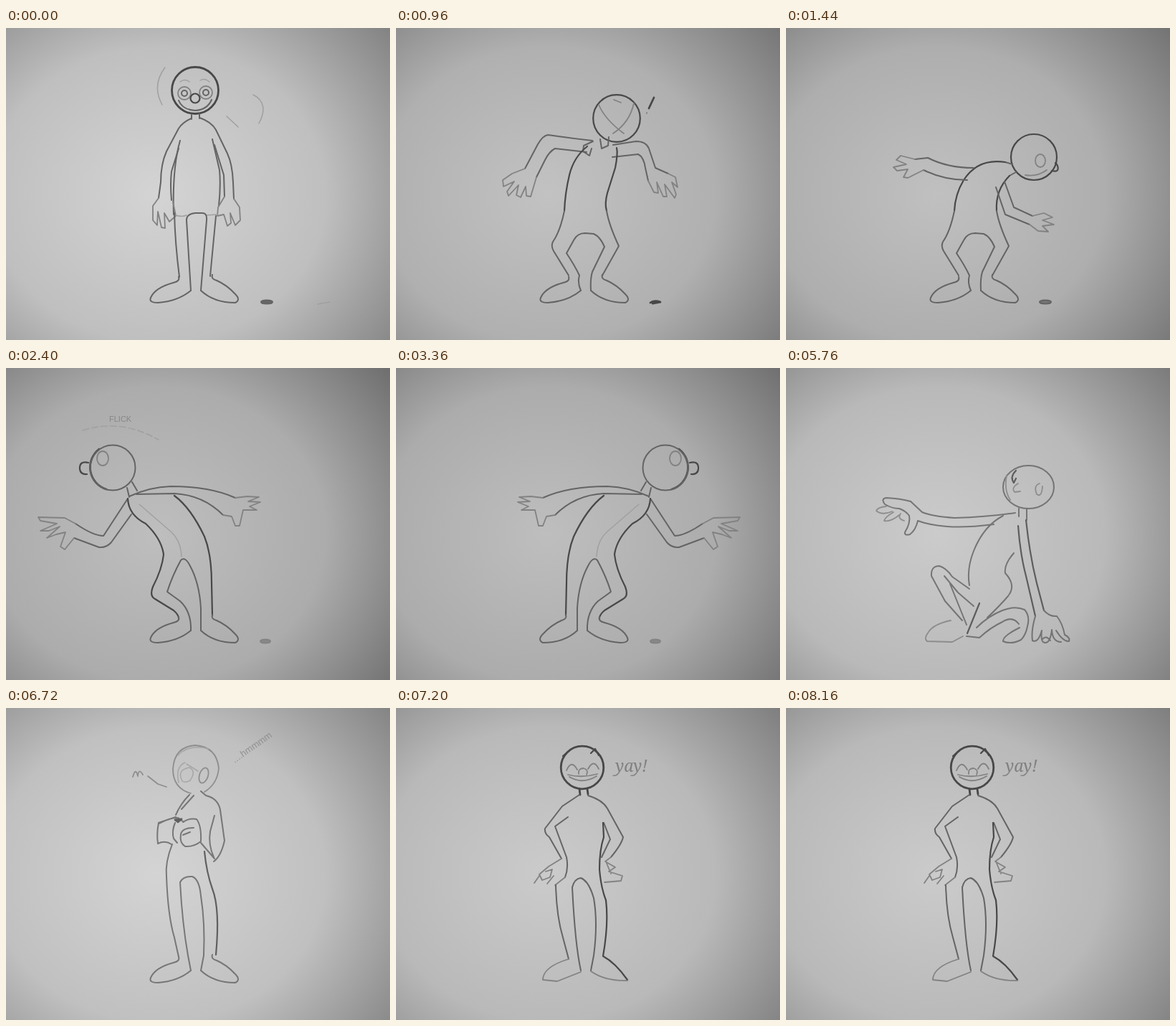
An HTML page for the animation above (8200 ms loop, 536 by 435 pixels).

```html
<!DOCTYPE html>
<html lang="en">
<head>
<meta charset="utf-8">
<title>Pencil test</title>
<style>
html, body { margin: 0; width: 100%; height: 100%; overflow: hidden; background: #aaa; }
#stage { width: 536px; height: 435px; overflow: hidden; }
#reel { display: flex; width: 5360px; animation: flip 8.2s step-end infinite; }
svg {
  display: block; flex: none; width: 536px; height: 435px; overflow: hidden;
  background: radial-gradient(ellipse 450px 395px at 212px 232px, var(--c), var(--m) 52%, var(--e) 100%);
}
.ink { filter: blur(.55px); fill: none; stroke: #646464; stroke-width: 2; stroke-linecap: round; stroke-linejoin: round; }
.dark { stroke: #484848; stroke-width: 2.2; }
.bold { stroke: #484848; stroke-width: 2.8; }
.soft { stroke: #828282; stroke-width: 1.8; }
.faint { stroke: #a0a0a0; stroke-width: 1.5; }
.light { opacity: .82; }
.ink text { fill: #808080; stroke: none; font: italic 22px "Noto Serif", "Liberation Serif", serif; }
.ink .note { fill: #868686; font: 13px "Liberation Sans", sans-serif; }

/* one strip of drawings, moved a full stage width at each cut */
@keyframes flip {
  0% { transform: translateX(0); }
  11.7073% { transform: translateX(-536px); }
  17.561% { transform: translateX(-1072px); }
  29.2683% { transform: translateX(-1608px); }
  40.9756% { transform: translateX(-2144px); }
  52.6829% { transform: translateX(-2680px); }
  64.3902% { transform: translateX(-3216px); }
  70.2439% { transform: translateX(-3752px); }
  81.9512% { transform: translateX(-4288px); }
  87.8049%, 100% { transform: translateX(-4824px); }
}
</style>
</head>
<body>
<div id="stage">
<div id="reel">

<!-- standing -->
<svg style="--c:#d4d4d4;--m:#bfbfbf;--e:#787878">
  <defs>
    <path id="feet" d="M241 347Q243 353 234 355Q208 362 202 376Q199 383 212 383Q240 381 258 366M272 366Q290 383 320 383Q328 379 320 371Q308 358 294 352Q286 350 288 344"/>
    <path id="legs" d="M235 258Q236 300 242 347M258 366L252 268Q252 259 264 258L274 258Q281 258 280 268L272 366M293 262L285 346"/>
    <path id="bent" d="M235 255Q229 284 219 298Q216 304 220 311L241 345M258 366Q253 355 256 345Q250 332 238 314L248 296Q253 286 264 286L276 287Q285 291 291 305L274 340Q271 350 272 366M294 255Q297 274 311 304L288 345"/>
    <g id="peer">
      <path class="bold" d="M130 113A32 32 0 0 0 140 169"/>
      <circle cx="149" cy="139" r="31.5"/>
      <path class="dark" d="M115 132Q102 129 103 141Q104 149 113 148"/>
      <ellipse class="soft" cx="135" cy="126" rx="8" ry="10"/>
      <path d="M169 167L172 180M176 159L183 171"/>
      <path d="M172 179Q200 166 230 165Q285 165 320 181M182 176L235 175Q275 177 303 205"/>
      <path class="soft" d="M320 181L337 179L353 180L338 186L355 187L340 193L350 198L331 198L326 220L320 220L315 207L303 205"/>
      <path d="M170 182L136 234Q122 234 97 217M175 204L147 243Q140 251 130 250L95 237"/>
      <path class="soft" d="M97 217L82 209L45 208L48 213L71 217L48 227L60 227L75 221L57 237L70 232L83 229L76 249L82 253L95 237"/>
      <path class="dark" d="M170 182Q171 205 195 217Q217 238 220 260Q218 280 205 305Q200 318 208 322L234 338Q241 344 241 349M235 178Q258 195 277 235Q287 260 287 300L288 345"/>
      <path d="M258 366Q259 340 243 325L225 312Q232 290 244 268Q250 262 257 276Q270 300 272 335L272 366"/>
      <path class="faint" d="M186 190L230 228Q244 240 245 263"/>
      <use href="#feet"/>
    </g>
  </defs>
  <g class="ink">
    <circle class="bold" cx="264" cy="87" r="32.5"/>
    <g class="soft">
      <circle cx="249" cy="91" r="9"/><circle cx="279" cy="90" r="9"/>
      <path class="faint" d="M243 75Q250 70 256 75M271 73Q277 69 284 75"/>
    </g>
    <circle cx="249" cy="91" r="4"/><circle cx="279" cy="90" r="4"/>
    <circle class="dark" cx="264" cy="98" r="6.5"/>
    <path d="M241 101Q246 114 264 115Q281 114 287 100M259 121V127M270 120V126"/>
    <path class="faint" d="M222 55Q203 80 218 107M345 93Q368 105 353 133M308 123L324 138"/>
    <path d="M259 126Q247 131 241 140L224 172Q216 190 216 215L213 237M270 125Q287 131 293 142L309 175Q316 190 317 215L318 238"/>
    <path d="M243 157Q232 195 234 260M288 155L298 198Q300 220 297 248"/>
    <path d="M241 168L231 200Q229 218 231 240M291 163L304 205L305 235"/>
    <path class="soft" d="M213 237L205 248L205 268L211 275L212 256L217 278L222 279L221 258L228 270L237 262L233 242M305 235L296 250L295 262L304 260L309 276L314 272L313 258L320 275L327 268L326 250L318 238"/>
    <path class="faint" d="M237 261Q246 264 252 261M280 261L295 260"/>
    <use href="#legs"/><use href="#feet"/>
    <ellipse cx="364" cy="382" rx="8" ry="2.6" fill="#666"/>
    <path class="faint" d="M435 385L452 382"/>
  </g>
</svg>

<!-- startled -->
<svg style="--c:#c2c2c2;--m:#b0b0b0;--e:#6c6c6c">
  <g class="ink">
    <circle class="dark" cx="308" cy="126" r="32.8"/>
    <path class="soft" d="M283 107Q292 128 318 147M332 105Q326 132 303 147M304 100L314 104"/>
    <path class="bold" d="M360 97L353 112"/><path class="soft" d="M350 118v1"/>
    <path d="M285 155L287 168L296 164L297 152"/>
    <path d="M274 157Q240 153 212 149Q205 150 198 162L180 196M266 173L222 168Q214 172 208 184L196 208"/>
    <path class="soft" d="M180 196L162 203L149 212L150 221L165 214L155 228L157 234L171 219L168 233L174 236L181 221L182 234L188 235L196 208"/>
    <path d="M275 158L262 164L261 172L270 178L273 168M303 163L335 158Q349 158 353 168L362 195L380 203M302 180L338 176Q346 180 348 195L352 213"/>
    <path class="soft" d="M352 213L360 229L366 230L364 215L373 235L378 235L375 218L389 237L391 232L385 215L393 222L390 208L380 203"/>
    <path class="dark" d="M267 165Q248 180 242 205Q236 230 235 255M308 167Q310 175 306 195L295 230Q291 245 294 255"/>
    <use href="#bent"/><use href="#feet"/>
    <path class="bold" d="M355 383Q360 379 369 382L358 384"/>
  </g>
</svg>

<!-- notices the thing on the floor -->
<svg style="--c:#c0c0c0;--m:#aeaeae;--e:#696969">
  <g class="ink">
    <circle class="dark" cx="346" cy="180" r="32"/>
    <path class="soft" d="M348 185a7 9 0 1 0 14 0a7 9 0 1 0 -14 0M334 205Q350 208 364 198"/>
    <path class="dark" d="M371 199Q382 202 379 192Q377 188 376 188"/>
    <path d="M316 190L306 187M321 201L312 206"/>
    <path class="dark" d="M306 187Q268 181 248 212Q236 232 235 255M312 206Q292 226 294 255"/>
    <path d="M262 195Q225 195 198 181L180 183M253 212Q220 212 192 198"/>
    <path class="soft" d="M180 183L160 178L154 184L168 190L150 194L155 199L170 197L164 208L170 209L192 198"/>
    <path d="M305 214L318 250L344 262M293 222L306 260L340 274"/>
    <path class="soft" d="M344 262L360 258L372 264L358 268L374 274L358 276L366 284L352 283L340 274"/>
    <use href="#bent"/><use href="#feet"/>
    <ellipse cx="362" cy="382" rx="8" ry="2.5" fill="#777"/>
  </g>
</svg>

<!-- checks to the left -->
<svg style="--c:#bebebe;--m:#acacac;--e:#636363">
  <g class="ink">
    <use href="#peer"/>
    <path class="faint" stroke-dasharray="9 4" d="M107 87Q160 70 213 100"/>
    <text class="note" x="144" y="75" style="font-size:11px">FLICK</text>
    <ellipse class="soft" cx="362" cy="381" rx="7" ry="2.6" fill="#888"/>
  </g>
</svg>

<!-- checks to the right -->
<svg style="--c:#bebebe;--m:#acacac;--e:#656565">
  <g class="ink">
    <use href="#peer" transform="matrix(-1 0 0 1 525 0)"/>
    <ellipse class="soft" cx="362" cy="381" rx="7" ry="2.6" fill="#888"/>
  </g>
</svg>

<!-- thinks it over -->
<svg style="--c:#bebebe;--m:#adadad;--e:#686868">
  <g class="ink">
    <path class="dark" d="M256 177A31 31 0 1 1 294 169"/>
    <path class="soft" d="M245 150Q250 139 257 149M246 152L257 153M281 147Q287 137 293 147M282 151L292 150"/>
    <circle class="soft" cx="267" cy="156" r="8.5"/>
    <path class="dark" d="M250 172Q262 184 276 178L294 166Q300 168 294 174L281 186"/>
    <path d="M243 181Q231 182 229 198L216 213Q212 229 221 234Q229 237 245 219L270 208Q275 202 272 196L281 186M229 198L233 207L259 190Q249 187 247 180M260 190L262 180"/>
    <path d="M292 180Q302 181 309 190L325 212Q328 220 322 228L309 242M300 196L307 215Q305 225 299 236"/>
    <path class="soft" d="M309 242L304 250L314 246L327 252L325 262L310 262L322 266L312 272L302 270L301 256"/>
    <path class="dark" d="M240 226Q238 250 237 272Q230 288 220 300Q217 308 224 316L241 347M302 195Q300 225 296 245Q294 268 303 290L308 305Q304 320 288 345"/>
    <path class="dark" d="M258 366L258 345Q251 325 240 311L250 292Q258 275 268 275Q278 276 283 290L288 308Q282 325 274 345L272 366"/>
    <use href="#feet"/>
    <text transform="translate(311 149) rotate(-10)">mental</text>
    <text transform="translate(338 172) rotate(-15)">dilemma</text>
    <text class="note" transform="translate(411 250) rotate(-47)" style="font-size:16px">but in mid scene is</text>
    <text class="note" transform="translate(452 241) rotate(-48)" style="font-size:16px">as well</text>
    <ellipse cx="361" cy="381" rx="7.5" ry="2.8"/>
  </g>
</svg>

<!-- winds up -->
<svg style="--c:#c2c2c2;--m:#b0b0b0;--e:#6a6a6a">
  <g class="ink">
    <circle class="dark" cx="262" cy="116" r="31.5"/>
    <path class="soft" d="M243 116a6 8 0 1 0 12 0a6 8 0 1 0 -12 0M268 116a6 8 0 1 0 12 0a6 8 0 1 0 -12 0M248 134Q261 142 275 133"/>
    <circle class="soft" cx="261" cy="126" r="5"/>
    <path d="M257 148V156M269 147V155"/>
    <path d="M257 156Q225 160 196 172Q170 177 148 174M245 174Q205 188 180 190Q160 190 146 185"/>
    <path class="soft" d="M148 174L130 168L104 171L108 176L126 178L101 186L106 190L124 186L112 198L119 199L134 190L140 200L146 185"/>
    <path d="M269 155Q290 157 299 172L322 208L354 194M288 176L314 224Q320 227 360 206"/>
    <path class="soft" d="M354 194L370 182L376 184L368 194L386 190L388 195L372 200L386 204L384 209L360 206"/>
    <path class="dark" d="M245 174Q232 210 235 258M288 176Q300 215 293 262"/>
    <use href="#legs"/><use href="#feet"/>
    <ellipse cx="361" cy="381" rx="7.5" ry="2.8"/>
  </g>
</svg>

<!-- crouches and grabs -->
<svg style="--c:#cbcbcb;--m:#b9b9b9;--e:#707070">
  <g class="ink light">
    <ellipse cx="338.5" cy="166" rx="35.5" ry="30"/>
    <path class="dark" d="M321 143Q312 152 318 160L321 154"/>
    <path class="soft" d="M324 161Q314 167 319 173L327 172M354 161Q345 164 350 176Q357 181 358 165M308 150Q304 170 313 184"/>
    <path d="M325 196V207M336 196V212"/>
    <path d="M320 202Q280 208 235 209Q205 207 190 201L174 186M290 218Q250 223 225 221Q200 219 184 213"/>
    <path d="M174 186Q160 182 140 181Q132 182 138 190Q148 196 158 196M184 213Q181 226 173 232Q165 234 166 229Q174 216 172 206Q167 199 158 196"/>
    <path class="soft" d="M140 193Q128 194 126 199Q134 206 148 200M150 201Q138 208 137 213Q146 215 158 205M160 203Q155 210 165 213"/>
    <path d="M303 206Q276 220 262 255Q252 280 256 303"/>
    <path class="dark" d="M324 220Q327 260 335 290L348 346M335 212Q340 260 350 300L360 338"/>
    <path d="M360 338Q368 347 378 346Q386 356 389 372Q397 376 395 381Q387 382 377 366M348 346Q342 366 344 380Q352 384 357 366Q355 382 361 383Q369 384 371 365Q372 382 384 382M358 378Q363 372 369 380"/>
    <path d="M203 290Q202 276 214 276Q224 279 232 291L256 308M203 290L222 325L246 352M221 290L240 313L262 332M229 301L252 358"/>
    <path class="soft" d="M230 352Q206 357 199 368Q192 377 197 381L232 382L247 374"/>
    <path class="dark" d="M270 328L253 370"/>
    <path d="M318 258Q304 274 306 286Q322 303 310 318Q298 332 281 348M266 362Q282 346 302 338Q320 331 333 337Q341 346 337 360Q335 372 328 379Q314 386 303 381Q302 374 326 362M252 374L270 376Q285 362 302 354Q316 345 325 357"/>
  </g>
</svg>

<!-- holds it up close -->
<svg style="--c:#d4d4d4;--m:#c0c0c0;--e:#7a7a7a">
  <g class="ink light">
    <path class="soft" d="M258 119Q233 112 233 85Q235 54 264 52Q294 54 297 84Q295 106 277 117"/>
    <path class="faint" d="M240 66Q255 50 283 57M241 104Q236 82 250 76M246 102Q238 86 256 83Q266 88 257 101Q250 105 246 102M252 78L268 88"/>
    <ellipse class="soft" cx="276" cy="94" rx="6" ry="11" transform="rotate(18 276 94)"/>
    <path class="soft" d="M177 96Q181 82 184 95Q185 83 191 93M198 95L212 106L224 110"/>
    <text class="note" transform="translate(319 77) rotate(-35)" style="font-size:13px">....hmmmm</text>
    <path d="M272 116L279 122Q296 126 299 142L305 185Q300 207 290 214M256 121Q244 133 237 149M262 122L245 141"/>
    <path d="M291 150L285 172Q282 190 290 208M272 188L291 210"/>
    <path d="M237 152L213 160Q210 176 212 189Q222 184 231 190M214 161Q228 153 240 153L248 159M236 160Q231 172 234 182L239 188"/>
    <path d="M247 159Q256 153 266 155Q273 164 272 186Q262 194 250 193Q242 188 244 176Q246 167 262 167M247 177L257 173"/>
    <path class="bold" d="M236 156L245 155L240 159Z"/>
    <path d="M232 190Q222 215 224 235Q226 290 235 320L241 347M258 366L254 345Q246 300 243 243Q247 234 260 235Q270 239 272 262Q278 300 276 345L272 366"/>
    <path class="dark" d="M277 200Q280 230 288 252Q299 280 293 344"/>
    <use href="#feet"/>
  </g>
</svg>

<!-- proud -->
<svg style="--c:#cbcbcb;--m:#b9b9b9;--e:#747474">
  <g class="ink">
    <circle class="bold" cx="260" cy="83" r="29.8"/>
    <path class="dark" d="M233 67L241 60M272 63L278 57L283 66"/>
    <path class="soft" d="M238 87Q245 71 253 86M268 85Q276 70 283 85M242 96Q260 107 280 95M255 92Q254 84 262 84Q269 86 266 93M240 93Q260 98 281 92"/>
    <path class="bold" d="M256 113L257 121M267 113L268 120"/>
    <path d="M256 121L232 137L208 168Q207 175 214 180L231 210M240 152L222 165L238 208Q241 223 236 236M268 122Q288 128 295 140L317 180Q315 190 300 208M290 160L299 183L287 208"/>
    <path class="soft" d="M231 210L213 221L200 232L204 240L215 236L218 225L209 228M200 234L193 244M220 234L211 245M236 236L222 247M300 208L292 214L306 222L297 228L316 234L314 241L291 243M293 214L300 231"/>
    <path d="M223 247Q224 290 233 320L241 350M258 366Q250 330 246 250Q249 238 258 237Q269 241 276 265Q282 300 276 345L272 366"/>
    <path class="dark" d="M289 160L290 180Q284 198 284 225Q286 250 293 268Q297 300 289 346Q306 355 323 379"/>
    <path class="soft" d="M241 350Q205 361 205 379L225 381L258 368M272 367Q292 381 323 380"/>
    <text x="306" y="89" style="font-size:23px">yay!</text>
  </g>
</svg>

</div>
</div>
</body>
</html>
```
